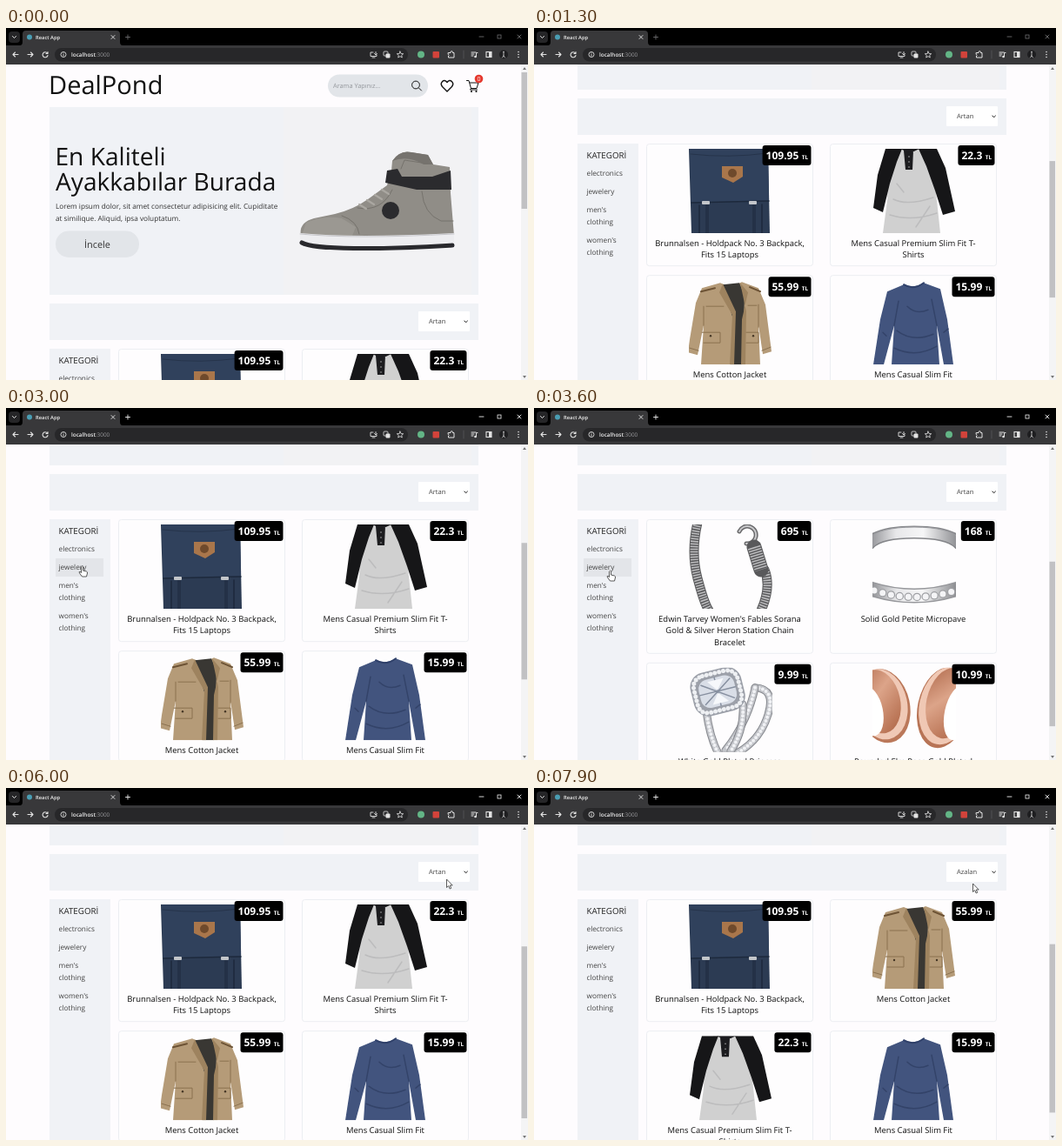
These frames come from a looping animation (600 px wide and 405 px high, 8000 ms). An HTML page:

```html
<!DOCTYPE html>
<html lang="tr">
<head>
<meta charset="utf-8">
<title>React App</title>
<style>
html, body { margin: 0; width: 100%; height: 100%; overflow: hidden; background: #fefcfe; }
svg { display: block; }
#stage { width: 100%; height: 100%; }
text { font-family: "Open Sans", "Noto Sans", sans-serif; text-rendering: geometricPrecision; }
.line { fill: none; stroke-linecap: round; stroke-linejoin: round; }
.flat { stroke-linecap: butt; }
</style>
</head>
<body>
<svg id="stage" viewBox="0 0 600 405">
  <defs>
    <linearGradient id="silver"><stop stop-color="#8d8e92"/><stop offset=".3" stop-color="#e8e8ea"/><stop offset=".6" stop-color="#f6f6f7"/><stop offset="1" stop-color="#87888c"/></linearGradient>
    <linearGradient id="copper" x2=".6" y2="1"><stop stop-color="#b06a4c"/><stop offset=".5" stop-color="#dca489"/><stop offset="1" stop-color="#b87253"/></linearGradient>
  </defs>
  <g id="page"></g>
  <rect x="592" y="42" width="8" height="363" fill="#f4f4f5"/>
  <path d="M594 48l2-3 2 3zM594 400l2 3 2-3z" fill="#777"/>
  <rect id="thumb" x="592.500" width="6.500" fill="#c1c1c3"/>
  <g id="chrome"></g>
  <g id="cursor" stroke="#333" stroke-width=".8" stroke-linejoin="round" fill="#fff">
    <path id="hand" d="M-1 1Q0-.8 1 1V5L5 6Q6.300 6.500 6 8L5 12H0L-3 8Q-4 6-2.500 6.300L-1 7.500Z"/>
    <path id="arrow" d="M0 0V9.500L2.200 7.600 3.700 11 5.200 10.300 3.800 7H6.700Z"/>
  </g>
</svg>
<script>
const $ = id => document.getElementById(id);
const rect = (x, y, w, h, fill, r = 0, more = '') =>
  `<rect x="${x}" y="${y}" width="${w}" height="${h}" rx="${r}" fill="${fill}" ${more}/>`;
const path = (d, fill) => `<path d="${d}" fill="${fill}"/>`;
const line = (d, color, w = 1) => `<path class="line" d="${d}" stroke="${color}" stroke-width="${w}"/>`;
const dashes = (d, color, w, dash) =>
  `<path class="line flat" d="${d}" stroke="${color}" stroke-width="${w}" stroke-dasharray="${dash}"/>`;
const beads = (d, color, w, gap) =>
  `<path class="line" d="${d}" stroke="${color}" stroke-width="${w}" stroke-dasharray="0 ${gap}"/>`;
const dot = (x, y, r, fill, more = '') => `<circle cx="${x}" cy="${y}" r="${r}" fill="${fill}" ${more}/>`;
const oval = (x, y, rx, ry, tilt, fill) =>
  `<ellipse cx="${x}" cy="${y}" rx="${rx}" ry="${ry}" fill="${fill}" transform="rotate(${tilt} ${x} ${y})"/>`;
const text = (x, y, size, s, fill = '#111', more = '') =>
  `<text x="${x}" y="${y}" font-size="${size}" fill="${fill}" ${more}>${s}</text>`;
const MID = 'text-anchor="middle"', BOLD = 'font-weight="700"', MEDIUM = 'font-weight="500"';
const PANEL = '#f0f2f6', PILL = '#e2e5e9';

// Product pictures, each in a 96 x 97 box
const gemBand = d => line(d, '#85878d', 9) + line(d, '#c3c5ca', 7) + beads(d, '#f1f2f5', 4, 4.5);
const chain = (d, w) => line(d, '#59595b', w) + dashes(d, '#bdbdbf', w - 2, '1.5 1.5');
const art = {
  backpack:
    path('M0 0H91L93 97H3Z', '#2c3b53') + path('M1 0H91L92 60 3 62Z', '#30415c') +
    line('M3 62L92 60M12 65V97M84 64V97', '#1d293c', 1.5) + line('M21 64V97M75 64V97', '#243147', 4) +
    line('M2 6Q46 11 90 5', '#26344b') +
    path('M38 20H62V32L51 39 38 33Z', '#a9764b') + dot(50, 28, 5, '#6f4a2c') +
    rect(15, 60, 9, 4, '#c3c6ca', 1) + rect(69, 60, 9, 4, '#c3c6ca', 1),
  tee:
    path('M28 0H56L64 20 73 50 78 97H12L17 60 18 34Z', '#d0d0d0') +
    line('M24 58Q40 66 70 56M20 76Q45 84 74 74M66 66L50 90M28 40L36 50', '#bcbcbd', 1.500) +
    path('M15 0H34L28 15 20 40 12 73 1 68 6 30Z', '#161618') +
    path('M53 0H74L84 22 95 72 81 76 72 48 62 20Z', '#161618') +
    path('M32 0H54Q43 7 32 0ZM36 2H47L46 24H38Z', '#1c1c1f') +
    [9, 15, 21].map(y => dot(42, y, .8, '#aaa')).join(''),
  jacket:
    path('M36 3L15 9 8 26 1 68-1 83 10 86 17 52 14 97H82L80 52 85 85 95 82 88 28 80 9 61 2 48 8Z', '#b59b78') +
    path('M39 5L58 3 64 18 61 97H48L51 45Z', '#393733') +
    path('M39 4L35 14 50 40 47 97H52L54 36ZM59 3L68 14 61 45 60 97H65L66 36Z', '#9e835f') +
    line('M17 30V52M80 28V54M15 60H36V72H17M66 60H80V72H66M20 30H40M68 29H78M1 78L11 81M84 81L94 77', '#8a714f') +
    line('M14 13L30 9M70 8L82 13', '#6d5335', 2) + dot(25, 64, 1.200, '#433524') + dot(74, 64, 1.200, '#433524'),
  sweater:
    path('M36 5Q47 10 59 3L78 10 86 45 93 97H82L74 52 77 97H22L25 52 13 97H1L9 45 17 13Z', '#42547e') +
    line('M25 52L30 24M74 52L68 22M28 58Q46 72 70 62M25 78Q50 90 74 76M40 30Q50 40 64 34M12 60L16 64M82 60L87 56', '#334369', 1.500) +
    line('M36 5Q47 12 59 3', '#2f4069', 2),
  bracelet:
    chain('M10-2Q2 32 10 62T23 99', 11) + chain('M87 52Q95 72 83 99', 11) +
    line('M58 8A10 10 0 1 1 66 22', '#69696b', 5) + line('M58 8A10 10 0 1 1 66 22', '#c9c9cb', 2) +
    chain('M75 26L83 52', 17),
  band:
    line('M-4 22Q8 9 48 9T100 22', '#85868a', 15) + line('M-4 22Q8 9 48 9T100 22', 'url(#silver)', 12) +
    line('M-4 16Q8 3 48 3T100 16', '#9b9ca0') +
    line('M-2 74Q48 90 98 74', '#96979b', 17) + line('M-2 74Q48 90 98 74', 'url(#silver)', 14) +
    beads('M2 76Q48 91 96 76', '#9fa0a4', 9.500, 10) + beads('M2 76Q48 91 96 76', '#f4f4f6', 7, 10),
  diamond:
    gemBand('M76 23Q100 24 91 54 82 84 54 99') + gemBand('M76 23Q68 62 42 95') +
    gemBand('M20 50Q24 80 34 99') + gemBand('M62 42Q64 72 48 96') +
    `<g transform="rotate(-14 33 27)">${rect(3, 2, 60, 51, '#9ca0a9', 17)}${
      beads('M20 6H46Q59 7 59 20V36Q58 49 46 49H20Q7 49 7 36V20Q7 7 20 6Z', '#eef0f3', 5, 5)}${
      rect(12, 11, 42, 33, '#d9dee7', 11)}${
      line('M16 16L50 39M50 16L16 39M33 11V44M12 27H54', '#8790a0', 1.500)}${
      path('M24 14L33 26 43 14ZM24 41L33 29 43 41Z', '#f6f8fb')}</g>`,
  rose:
    oval(13, 44, 30, 43, -12, '#bb785a') + oval(11, 42, 29, 41, -12, '#f0c9b6') +
    oval(8, 39, 24, 37, -12, 'url(#copper)') + oval(-3, 50, 15, 29, -12, '#fff') +
    oval(81, 46, 29, 47, 12, '#b87456') + oval(83, 44, 29, 45, 12, '#f0c8b4') +
    oval(87, 41, 25, 41, 12, 'url(#copper)') + oval(98, 52, 15, 32, 12, '#fff')
};

const goods = {
  backpack: ['109.95', 'Brunnalsen - Holdpack No. 3 Backpack,', 'Fits 15 Laptops'],
  tee: ['22.3', 'Mens Casual Premium Slim Fit T-', 'Shirts'],
  jacket: ['55.99', 'Mens Cotton Jacket'],
  sweater: ['15.99', 'Mens Casual Slim Fit'],
  bracelet: ['695', "Edwin Tarvey Women's Fables Sorana", 'Gold &amp; Silver Heron Station Chain', 'Bracelet'],
  band: ['168', 'Solid Gold Petite Micropave'],
  diamond: ['9.99', 'White Gold Plated Princess'],
  rose: ['10.99', 'Rounded Elm Rose Gold Plated']
};

function card(key, x, y, h) {
  const [price, ...title] = goods[key];
  const digits = price.replace('.', '').length;
  const w = digits * 6.9 + (digits < price.length ? 3.4 : 0) + 18;
  return rect(x + .5, y + .5, 191, h - 1, '#fefdfe', 3, 'stroke="#eceef2"') +
    `<svg x="${x + 49}" y="${y + 6}" width="96" height="97">${art[key]}</svg>` +
    rect(x + 189.5 - w, y + 2, w, 23, '#000', 3) +
    text(x + 193.5 - w, y + 17.8, 12, price, '#fff', BOLD) +
    text(x + 186, y + 17.8, 6.4, 'TL', '#fff', BOLD + ' text-anchor="end"') +
    title.map((s, i) => text(x + 96, y + 117.6 + i * 13.5, 9.45, s, '#111', MID)).join('');
}

function list(keys) {
  let out = '', y = 369;
  for (let i = 0; i < keys.length; i += 2) {
    const pair = keys.slice(i, i + 2);
    const h = 114 + 13.6 * Math.max(...pair.map(k => goods[k].length - 1));
    out += card(pair[0], 129, y, h) + card(pair[1], 340, y, h);
    y += h + 10;
  }
  return out;
}

const shoe =
  path('M339 239Q336 224 354 219L378 214Q399 209 416 197L438 181 443 164 444 153Q452 140 466 143L485 146 491 157 510 160 511 190 515 239Z', '#908d87') +
  path('M444 153Q453 140 466 143L485 146 491 157 480 157Q462 146 444 153Z', '#76736e') +
  path('M345 224Q365 215 386 219L402 229 398 239 340 238Z', '#9b9892') +
  line('M386 216Q404 222 406 237M404 207Q432 212 444 186M478 188Q480 214 500 222L514 222M454 162L458 152 484 156', '#75726c') +
  line('M406 203L414 208M415 198L423 203M424 192L432 197M432 186L440 191', '#aaa7a1', 2.200) +
  path('M438 164L450 162 455 171 490 171 511 164 512 186 472 186 436 178Z', '#2b2b2e') +
  dot(442, 210, 10, '#2b2b2e') +
  path('M338 236Q400 242 515 236L515 250Q430 257 348 252 336 248 338 236Z', '#ededf0') +
  line('M340 247Q350 253 400 253.500T513 250', '#29292d', 5) + line('M338 237Q400 243 515 237', '#bcbcc0', .8);

const hoverBox = [[393, 21], [414, 21], [435, 35]];
$('page').innerHTML =
  text(49, 76, 29, 'DealPond') +
  rect(370, 53.500, 115, 26, PILL, 13) + text(376, 69, 7.35, 'Arama Yapınız...', '#92959a') +
  dot(471, 65.5, 4.4, 'none', 'stroke="#111" stroke-width="1"') + line('M474.500 69L477.500 72', '#111') +
  line('M507 73L501.500 67.500C498 63 503.500 57.500 507 62.500C510.500 57.500 516 63 512.500 67.500Z', '#111', 1.400) +
  line('M529.500 60.500H532L534.500 69.500H541L543 63H533M534.500 69.500L533.500 71H541.500', '#111') +
  dot(535, 73, 1.1, '#111') + dot(540.5, 73, 1.1, '#111') +
  dot(543.5, 58.5, 4.8, '#e5392f') + text(543.5, 61, 7, '0', '#fff', MID) +
  rect(50, 91, 493, 216, PANEL) + rect(319, 91, 216, 216, '#f2f2f4') + shoe +
  text(56.5, 157.5, 28.1, 'En Kaliteli', '#111', MEDIUM) + text(57, 186.5, 28.1, 'Ayakkabılar Burada', '#111', MEDIUM) +
  text(57, 208.3, 8.23, 'Lorem ipsum dolor, sit amet consectetur adipisicing elit. Cupiditate', '#333') +
  text(57, 221.8, 8.23, 'at similique. Aliquid, ipsa voluptatum.', '#333') +
  rect(57, 233.500, 96, 30.5, PILL, 15) + text(105, 252.5, 10.9, 'İncele', '#333', MID) +
  rect(50, 317, 493, 42, PANEL) + rect(474, 326, 59, 23, '#fff', 1) +
  '<text id="order" x="486" y="340.3" font-size="7.5" fill="#444"></text>' + line('M527 337L528.700 338.700 530.400 337', '#111') +
  rect(50, 369, 70, 500, PANEL) + '<rect id="hover" x="57" width="55" fill="#e3e5e9"/>' +
  text(60.5, 385.8, 9.75, 'KATEGORİ', '#222') +
  [[405.6, 'electronics'], [426.6, 'jewelery'], [448, "men's"], [461.5, 'clothing'], [483, "women's"], [496.5, 'clothing']]
    .map(([y, s]) => text(60.5, y, 8.25, s, '#444')).join('') +
  '<g id="list"></g>';

const LIGHT = '#e3e3e3';
$('chrome').innerHTML =
  rect(0, 0, 600, 20, '#000') + rect(0, 20, 600, 22, '#38383a') +
  rect(3, 4, 13, 13, '#252527', 4) + line('M7.500 9.500L9.500 11.500 11.500 9.500', LIGHT) +
  path('M16 20Q19 20 19 16V7Q19 3 23 3H127Q131 3 131 7V16Q131 20 134 20Z', '#38383a') +
  dot(27, 10.5, 3, '#4a9db3') + text(34, 12.5, 5.8, 'React App', '#eee', 'font-weight="600"') +
  '<g id="controls">' +
  line('M137.500 10.500H142.500M140 8V13M544 10H549M588 8L592 12M592 8L588 12', 'currentColor', .9) +
  rect(565, 8, 4, 4, 'none', 0, 'stroke="currentColor" stroke-width=".8"') + '</g>' +
  line('M121 8.500L125 12.500M125 8.500L121 12.500', LIGHT, .9) +
  line('M14 30.500H8M10.500 28L8 30.500 10.500 33M25 30.500H31M28.500 28L31 30.500 28.500 33M47.500 29A3 3 0 1 0 48 31.500M48 27.500V29.500H46', LIGHT, 1.100) +
  rect(56, 23, 406, 15.5, '#272729', 7.7) +
  dot(66, 30.5, 3, 'none', `stroke="${LIGHT}" stroke-width=".9"`) + line('M66 30.500V32M66 29V29.100', LIGHT, .9) +
  text(75, 32.8, 6.4, 'localhost<tspan fill="#9a9a9d" font-weight="400">:3000</tspan>', '#f2f2f2', 'font-weight="600"') +
  line('M422 28H419V32.500H426V31M421 34H424M425 27.500V30.500M423.500 29.500L425 31 426.500 29.500', LIGHT, .9) +
  rect(434, 27, 5, 5, 'none', 1, `stroke="${LIGHT}" stroke-width=".8"`) + rect(436.5, 29.5, 5, 5, LIGHT, 1) +
  line('M453 27L454.100 29.500 456.700 29.700 454.700 31.400 455.300 34 453 32.600 450.700 34 451.300 31.400 449.300 29.700 451.900 29.500Z', LIGHT, .8) +
  dot(477, 30.500, 4, '#63b586') + rect(490.5, 27, 7.500, 7.500, '#d2433b', 1) +
  line('M508.500 28.500H511Q511 26.500 512.300 26.500T513.500 28.500H515V34H508.500V32Q510.300 31.500 508.500 30.500Z', LIGHT) +
  line('M526 26V35', '#59595c', .8) + line('M535 28H540M535 30H538M535 32H537M540.500 33V28.500H542', LIGHT) + dot(539.5, 33, 1.3, LIGHT) +
  rect(552, 27.5, 6, 6, 'none', 0, `stroke="${LIGHT}" stroke-width="1.1"`) + rect(555, 27.5, 3, 6, LIGHT) +
  dot(572, 30.500, 5, '#1e1e20') + line('M572 28.500V32L570.500 34M572 32L573.500 34', '#ddd', .8) + dot(572, 27.500, .8, '#ddd') +
  [27.500, 30.500, 33.500].map(y => dot(589, y, .8, LIGHT)).join('');

// Each view: start, page height, sort label, products
const mens = ['backpack', 'tee', 'jacket', 'sweater'];
const views = [
  [0, 802, 'Artan', mens],
  [3600, 665, 'Artan', ['bracelet', 'band', 'diamond', 'rose']],
  [4600, 637, 'Artan', mens],
  [6700, 650, 'Azalan', ['backpack', 'jacket', 'tee', 'sweater']]
].map(([start, height, order, keys]) => ({ start, height, order, html: list(keys) }));

const scrollKeys = [[1000, 0], [1100, 13], [1200, 130], [1300, 236], [1400, 240], [1500, 241]];
const cursorKeys = [
  [2100, 97, 180], [2400, 88.5, 165.5], [2700, 88.5, 165.5], [2900, 87.5, 177], [3100, 87.5, 187],
  [3800, 87.5, 187], [4300, 87.5, 210], [5100, 87.5, 210], [5350, 220, 172], [5700, 514, 82], [6000, 506.5, 105],
  [6500, 505.5, 135], [7100, 505.5, 135], [7900, 504.5, 110]
];

function at(keys, t) {
  if (t <= keys[0][0]) return keys[0].slice(1);
  const i = keys.findIndex(k => k[0] > t);
  if (i < 0) return keys[keys.length - 1].slice(1);
  const a = keys[i - 1], b = keys[i], p = (t - a[0]) / (b[0] - a[0]);
  return a.slice(1).map((v, j) => v + (b[j + 1] - v) * p);
}

let shown;
function draw(t) {
  const view = views.filter(v => v.start <= t).pop();
  if (view !== shown) {
    $('list').innerHTML = view.html;
    $('order').textContent = view.order;
    shown = view;
  }
  const [scroll] = at(scrollKeys, t);
  $('page').setAttribute('transform', `translate(0 ${-scroll})`);
  $('thumb').setAttribute('y', 51 + scroll * 347 / view.height);
  $('thumb').setAttribute('height', 347 * 363 / view.height);

  const [x, y] = at(cursorKeys, t);
  const over = t < 2100 || x < 57 || x > 112 ? -1 : hoverBox.findIndex(([top, h]) => y + scroll >= top && y + scroll < top + h);
  const [top, h] = hoverBox[over] || [0, 0];
  $('hover').setAttribute('y', top);
  $('hover').setAttribute('height', h);
  $('cursor').setAttribute('transform', `translate(${x} ${y})`);
  $('cursor').style.display = t < 2100 ? 'none' : '';
  $('hand').style.display = over < 0 ? 'none' : '';
  $('arrow').style.display = over < 0 ? '' : 'none';
  $('controls').style.color = t < 2400 ? '#6c6c6e' : '#f0f0f0';
}

const begin = performance.now();
function tick() {
  const t = (performance.now() - begin) % 8000;
  draw(Math.floor(t / 100) * 100); // the screen steps ten times a second
  requestAnimationFrame(tick);
}
tick();
</script>
</body>
</html>
```
